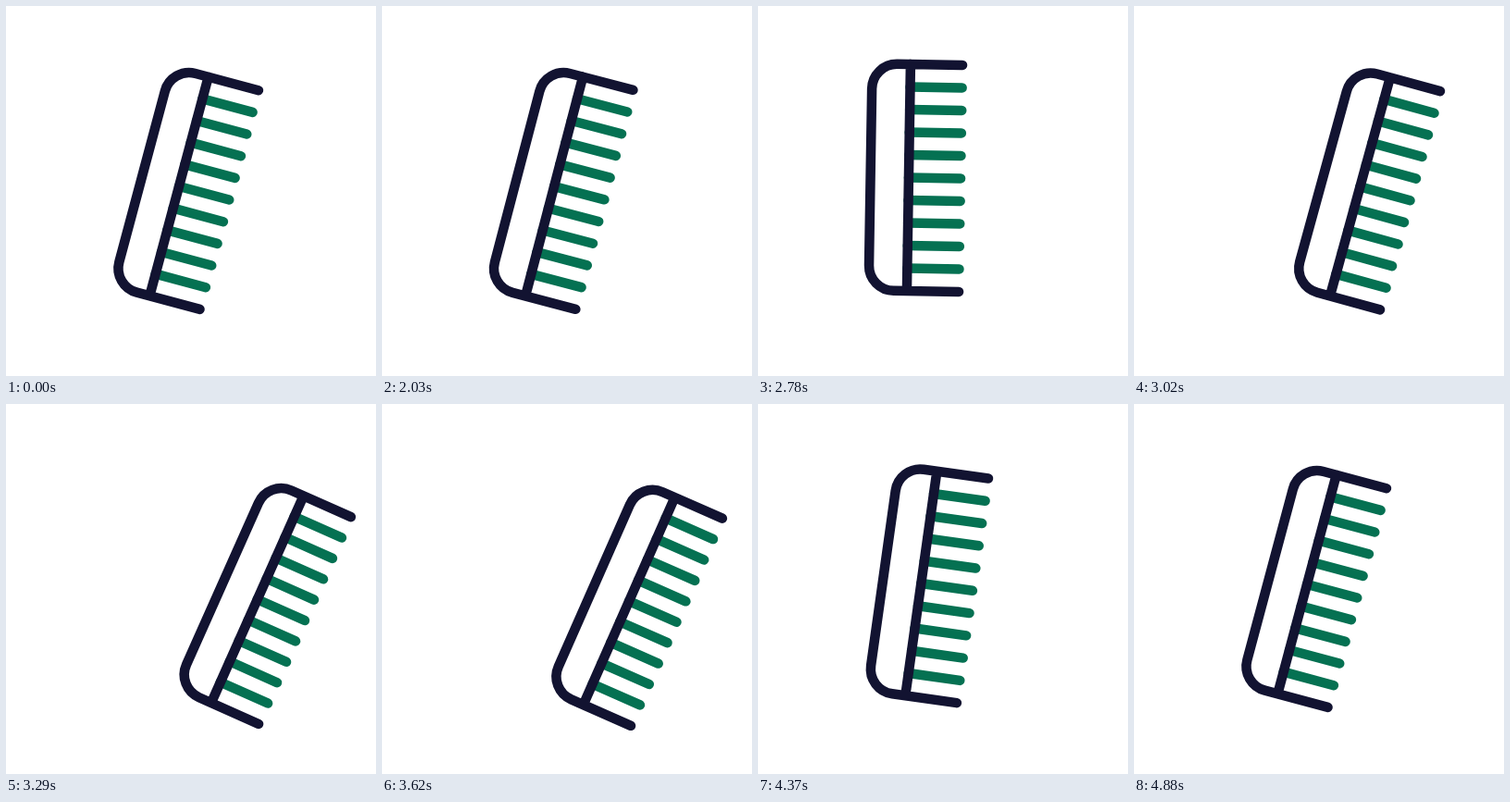
These frames come from a looping animation (400 by 400 pixels, 5.06 s). An HTML page:

```html
<!DOCTYPE html>
<html lang="en">
<head>
<meta charset="utf-8">
<title>Comb</title>
<style>
  html, body { margin: 0; width: 100%; height: 100%; overflow: hidden; background: #fff; }
  svg { display: block; width: 100%; height: 100%; }
  path { fill: none; stroke-width: 10.5; stroke-linecap: round; stroke-linejoin: round; }
</style>
</head>
<body>
<svg viewBox="0 0 400 400">
  <g id="comb">
    <path id="teeth" stroke="#057152"/>
    <path id="body" stroke="#121331"/>
  </g>
</svg>
<script>
const LOOP = 5060, START = 2000, STEP = 30, STEPS = 96;

// Comb geometry, relative to the pivot near its lower end
const LEFT = -51.75, RIGHT = 45.75, TOP = -210.5, BOTTOM = 34.5;
const BAR = -10.4, RADIUS = 27, GAP = (BOTTOM - TOP) / 10;

const comb = document.getElementById('comb');
document.getElementById('teeth').setAttribute('d',
  Array.from({ length: 9 }, (_, i) => `M${BAR} ${TOP + GAP * (i + 1)}H${RIGHT}`).join(''));
document.getElementById('body').setAttribute('d',
  `M${RIGHT} ${TOP}H${LEFT + RADIUS}A${RADIUS} ${RADIUS} 0 0 0 ${LEFT} ${TOP + RADIUS}` +
  `V${BOTTOM - RADIUS}A${RADIUS} ${RADIUS} 0 0 0 ${LEFT + RADIUS} ${BOTTOM}H${RIGHT}` +
  `M${BAR} ${TOP}V${BOTTOM}`);

// step, angle, pivot x, pivot y
const keys = [
  [0, 15, 174.3, 282.7],
  [16.5, -15, 132.4, 297.2],
  [26, 0.93, 171.9, 273.7],
  [28.5, 5.5, 191, 272.3],
  [34, 15.37, 231.1, 283],
  [36, 17.4, 238, 287],
  [47.5, 26, 246.8, 298],
  [54, 23.8, 241.1, 297.8],
  [69, -0.5, 171, 281.5],
  [79, 8, 174.4, 282.6],
  [90, 13.9, 174.3, 282.7],
  [STEPS, 15, 174.3, 282.7]
];

// Monotone cubic through one column of the keys; it rests at every turning point
function track(column) {
  const at = keys.map(k => k[0]), value = keys.map(k => k[column]);
  const width = i => at[i + 1] - at[i];
  const secant = i => (value[i + 1] - value[i]) / width(i);
  const slope = at.map((_, i) => {
    if (i === 0 || i === at.length - 1) return 0;
    const a = secant(i - 1), b = secant(i);
    if (a * b <= 0) return 0;
    const wa = 2 * width(i) + width(i - 1), wb = width(i) + 2 * width(i - 1);
    return (wa + wb) / (wa / a + wb / b);
  });
  return step => {
    let i = 0;
    while (i < at.length - 2 && step > at[i + 1]) i++;
    const h = width(i), u = (step - at[i]) / h, v = 1 - u;
    return value[i] * (1 + 2 * u) * v * v + value[i + 1] * u * u * (3 - 2 * u) +
      h * u * v * (slope[i] * v - slope[i + 1] * u);
  };
}

const [angle, pivotX, pivotY] = [1, 2, 3].map(track);

function draw(time) {
  const step = Math.max(0, Math.min(STEPS, Math.floor((time % LOOP - START) / STEP)));
  comb.setAttribute('transform',
    `translate(${pivotX(step)} ${pivotY(step)}) rotate(${angle(step)})`);
}

const begin = performance.now();
function tick() {
  draw(performance.now() - begin);
  requestAnimationFrame(tick);
}
tick();
</script>
</body>
</html>
```
